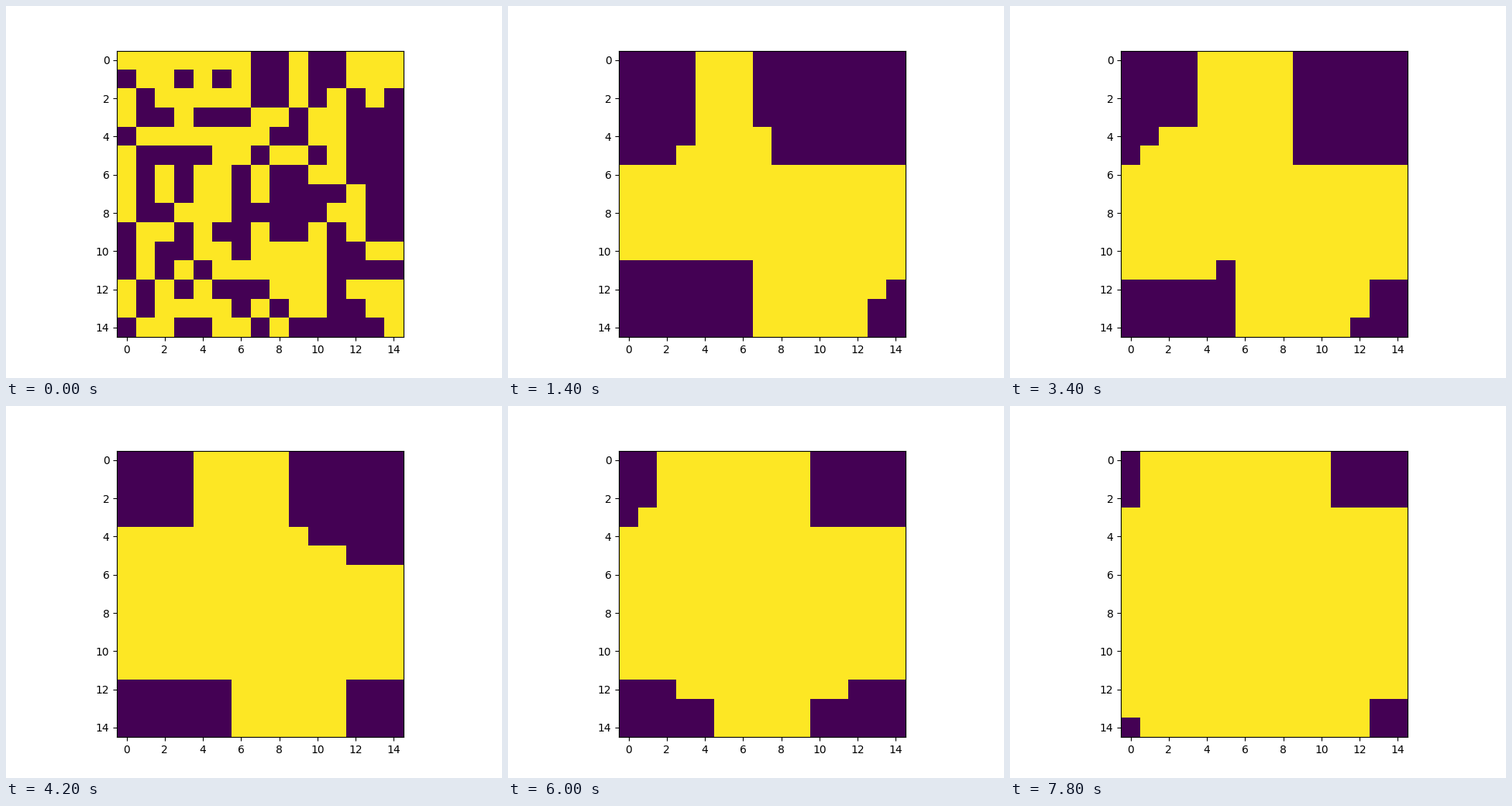
A matplotlib script that plays this animation: 640 px wide and 480 px high, repeating every 8 s.

```python
import numpy as np
import matplotlib.pyplot as plt
from matplotlib.animation import FuncAnimation

N = 15            # lattice side, edges wrap around
STEPS = 40
INTERVAL = 200
LOW, HIGH = -0.5, N - 0.5

# Radii of the down-spin domain in each corner: centre, widths, heights
KEYS = (3, 7, 21, 30, 39)
CORNERS = [
    ((LOW, LOW), (3.4, 4.2, 4.3, 2.2, 1.2), (6.4, 6.3, 4.3, 3.6, 3.2)),
    ((HIGH, LOW), (8.2, 8.0, 6.0, 5.2, 4.4), (5.0, 6.4, 5.65, 4.4, 3.4)),
    ((LOW, HIGH), (4.4, 7.4, 6.3, 5.1, 1.0), (4.2, 4.45, 3.35, 2.65, 1.0)),
    ((HIGH, HIGH), (1.2, 2.2, 3.3, 5.1, 2.2), (1.2, 2.6, 3.2, 2.65, 2.2)),
]
# Small domains left by the quench, gone by the second key
ISLANDS = [((10.5, 6.5), 1.2, 2.0), ((5.5, 10.5), 2.0, 1.2)]

rows, cols = np.mgrid[:N, :N]


def blob(centre, width, height):
    """Rounded box of down spins."""
    dx = np.abs(cols - centre[0]) / width
    dy = np.abs(rows - centre[1]) / height
    return dx ** 4 + dy ** 4 < 1


def ordered(key):
    """Spins once the domains of one key step have formed."""
    down = np.zeros((N, N), bool)
    for centre, widths, heights in CORNERS:
        down |= blob(centre, widths[key], heights[key])
    if key == 0:
        for island in ISLANDS:
            down |= blob(*island)
    return 1 - down.astype(int)


def opposed(grid):
    """Number of neighbours with the other spin, for every site."""
    shifts = [(1, 0), (-1, 0), (1, 1), (-1, 1)]
    return sum(np.roll(grid, s, axis) != grid for s, axis in shifts)


def relax(grid, goal, count, rng):
    """Flip the least stable sites that still differ from the goal."""
    grid = grid.copy()
    for _ in range(count):
        score = opposed(grid) + 0.9 * rng.random((N, N))
        score[grid == goal] = -1
        site = np.unravel_index(score.argmax(), score.shape)
        grid[site] = goal[site]
    return grid


def evolve():
    rng = np.random.default_rng(4)
    states = [rng.integers(0, 2, (N, N))]
    for key, end in enumerate(KEYS):
        begin, goal = len(states) - 1, ordered(key)
        total = int((states[-1] != goal).sum())
        power = 2 if key == 0 else 1   # the quench is fastest early on
        done = 0
        for step in range(begin + 1, end + 1):
            t = (step - begin) / (end - begin)
            target = round(total * (1 - (1 - t) ** power))
            states.append(relax(states[-1], goal, target - done, rng))
            done = target
    return states


states = evolve()
fig, ax = plt.subplots(figsize=(6.4, 4.8), dpi=100)
image = ax.imshow(states[0], cmap="viridis", vmin=0, vmax=1)


def update(i):
    image.set_data(states[i])
    return [image]


anim = FuncAnimation(fig, update, frames=STEPS, interval=INTERVAL,
                     repeat=True, repeat_delay=0)
plt.show()
```
